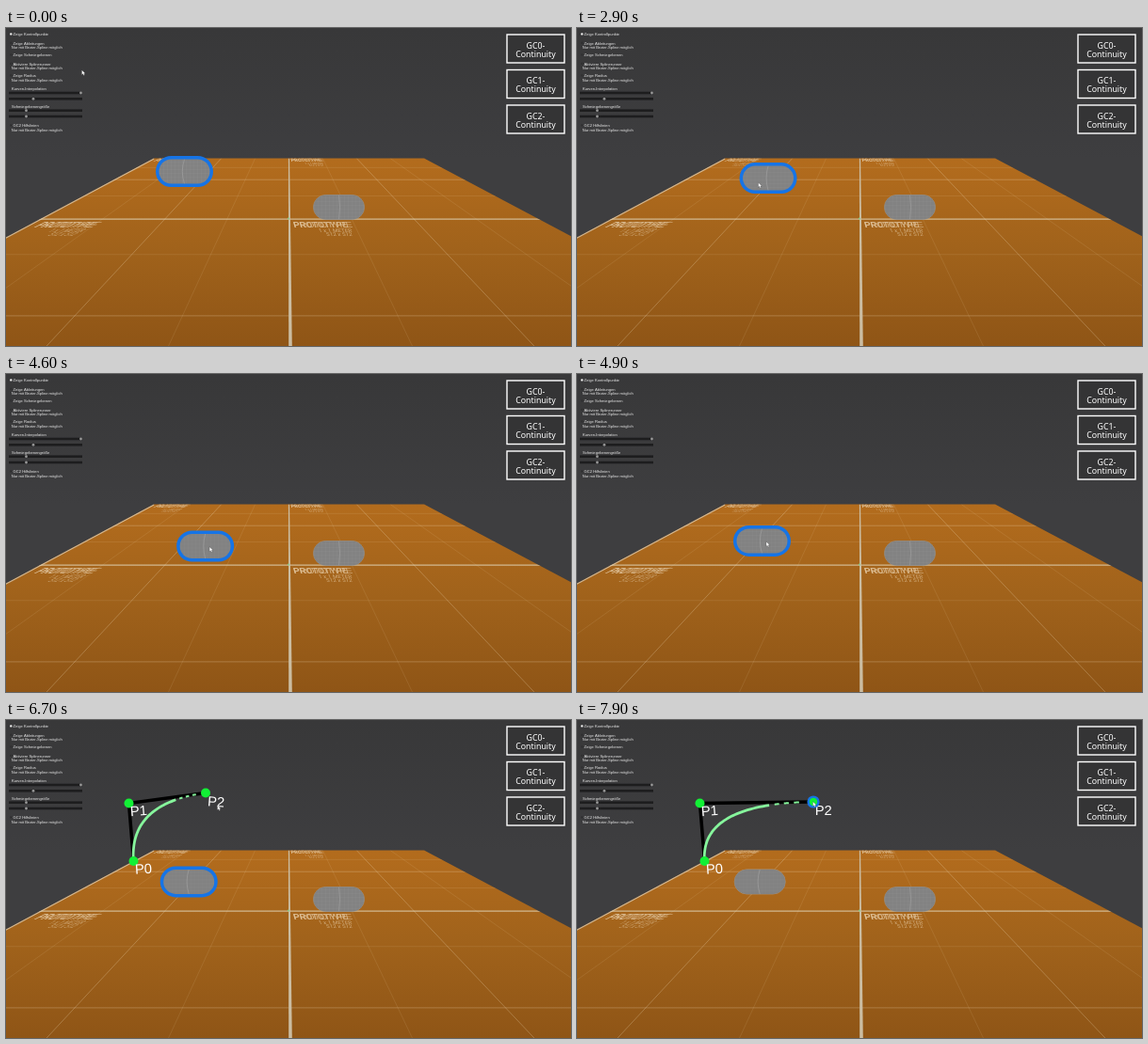
Recreate the animation shown at these times as an HTML page with a canvas. Size 600 by 338 pixels, loop 8 s.

```html
<!DOCTYPE html>
<html lang="de">
<head>
<meta charset="utf-8">
<style>
html, body { margin: 0; width: 600px; height: 338px; overflow: hidden; background: #3a3a3b; }
canvas { display: block; }
</style>
</head>
<body>
<canvas id="stage" width="600" height="338"></canvas>
<script>
const c = document.getElementById('stage').getContext('2d');
const LOOP = 8000, BLUE = '#1674e6', GREEN = '#12f035', MINT = '#86f59c';
const SANS = '"Liberation Sans", Arial, sans-serif';
const ROBOTO = 'Roboto, sans-serif', NOTO = '"Noto Sans", sans-serif';

const P0 = [135.5, 150], P1 = [130.5, 88.5], P2 = [212, 77.5], P2_END = [251, 87];
const shown = { p0: 5400, p1: 5800, p2: 6300, pick: 7350 };
const drag = { start: 2500, circle: 3500, back: 4600, end: 5050 };

function ease(t, from, to) {
  const u = Math.min(1, Math.max(0, (t - from) / (to - from)));
  return u * u * (3 - 2 * u);
}
const mix = (a, b, u) => a.map((v, i) => v + (b[i] - v) * u);

// Dragged onto a circle, led round it, then partly back
function capsulePos(t) {
  const { start, circle, back, end } = drag;
  const turn = 285 * ease(t, circle, back) - 95 * ease(t, back, end);
  const a = turn * Math.PI / 180;
  const onCircle = [208 + 14 * Math.cos(a), 169.5 - 14 * Math.sin(a)];
  return mix([189.5, 152.5], onCircle, ease(t, start, circle - 100));
}

const endPos = t => mix(P2, P2_END, ease(t, 7450, 7850));

function grip(t) {
  const [x, y] = capsulePos(t);
  const u = ease(t, drag.circle, drag.back);
  return [x - 10 + 15 * u, y + 5 - 4 * u];
}

function cursorPos(t) {
  const visits = [
    [1200, 1600, [228, 110]], [2200, 2450, grip(t)], [5150, 5350, P0], [5500, 5700, P1],
    [5900, 6150, P2], [6400, 6650, [225, 91]], [7200, 7350, endPos(t)]
  ];
  return visits.reduce((pos, [from, to, goal]) => mix(pos, goal, ease(t, from, to)), [81, 45]);
}

function path(points, color, width) {
  c.beginPath();
  points.forEach(p => c.lineTo(...p));
  c.strokeStyle = color;
  c.lineWidth = width;
  c.stroke();
}

function fillShape(points, color) {
  c.beginPath();
  points.forEach(p => c.lineTo(...p));
  c.closePath();
  c.fillStyle = color;
  c.fill();
}

function dot(x, y, r, color) {
  c.beginPath();
  c.arc(x, y, r, 0, 7);
  c.fillStyle = color;
  c.fill();
}

function text(s, x, y, size, family, color = '#fff', align = 'left') {
  c.font = `${size}px ${family}`;
  c.textAlign = align;
  c.fillStyle = color;
  c.fillText(s, x, y);
}

function gradient(from, to, ...colors) {
  const g = c.createLinearGradient(0, from, 0, to);
  colors.forEach((color, i) => g.addColorStop(i / (colors.length - 1), color));
  return g;
}

// Floor perspective: u runs -1..1 across, v counts tiles beyond the front label line
const MID = 300.5, HORIZON = 62, BOTTOM = 338;
const floorY = v => HORIZON + 1 / (.00709 + .00598 * v);
const floorX = (u, y) => MID + u * (y - HORIZON) * 1.876 + Math.max(0, y - 138) * .0075;
const FAR = floorY(1);
const rail = u => [[floorX(u, FAR), FAR], [floorX(u, BOTTOM), BOTTOM]];

function floorLabel(x, y, scale) {
  c.save();
  c.transform(scale, 0, scale * (x + 30 * scale - MID) / (y - HORIZON), scale * .82, x, y);
  const color = 'rgba(228,202,165,.72)';
  text('PROTOTYPE', 0, 0, 10.2, 'bold ' + ROBOTO, color);
  c.font = `bold 10.2px ${ROBOTO}`;
  c.fillText('PROTOTYPE', 0, 0);
  text('1 x 1 METER', 25, 6.3, 6.3, ROBOTO, color);
  text('512 x 512', 32, 11, 6.3, ROBOTO, color);
  c.restore();
}

function floor() {
  c.save();
  fillShape([...rail(-1), ...rail(1).reverse()], gradient(FAR, BOTTOM, '#b36c1d', '#a0621b', '#8f5516'));
  c.clip();
  for (let q = -3; q < 4; q++) {
    const alpha = q % 2 ? .12 : .3;
    const color = `rgba(240,222,190,${alpha})`;
    const y = floorY(q / 4);
    if (q) path(rail(q / 4), color, .9);
    if (q && q > -3) path([[0, y], [600, y]], color, .9);
  }
  path([[0, 203.2], [600, 203.2]], 'rgba(225,212,185,.75)', 1.2);
  path(rail(-1), 'rgba(225,212,190,.75)', 2.2);
  fillShape([[299.9, FAR], [301.1, FAR], [303.8, BOTTOM], [300.2, BOTTOM]], '#cbbda2');
  c.restore();
  [306, 29].forEach(x => floorLabel(x, 211.8, 1));
  [303, 156].forEach(x => floorLabel(x, 142, .55));
  dot(300, 202.5, .9, '#7fd08a');
}

function panel() {
  const small = (s, x, y) => text(s, x, y, 4.1, SANS, '#eee');
  const toggle = (label, y, on, hinted) => {
    dot(5.3, y - 1.6, 1.2, on ? '#eee' : '#303031');
    small(label, 7.6, y);
    if (hinted) small('Nur mit Bezier-Spline möglich', 5.8, y + 4.5);
  };
  const sliders = (label, y, ...handles) => {
    small(label, 6, y);
    handles.forEach((x, i) => {
      const sy = y + 3 + i * 6.3;
      c.fillStyle = '#1d1d1e';
      c.fillRect(3, sy - 1.3, 78, 2.6);
      dot(x, sy, 1.4, '#999');
    });
  };
  toggle('Zeige Kontrollpunkte', 8, true);
  toggle('Zeige Ableitungen', 17.5, false, true);
  toggle('Zeige Schmiegebenen', 30);
  toggle('Aktiviere Splinerunner', 39.5, false, true);
  toggle('Zeige Radius', 52, false, true);
  sliders('Kurven-Interpolation', 66, 79.5, 29);
  sliders('Schmiegebenengröße', 84.7, 21.5, 21.5);
  toggle('GC2 Hilfslinien', 105, false, true);
}

function buttons() {
  for (let i = 0; i < 3; i++) {
    const y = 7 + i * 37.5;
    c.fillStyle = '#343435';
    c.fillRect(532, y, 61, 30);
    c.strokeStyle = '#fff';
    c.lineWidth = 1.4;
    c.strokeRect(532, y, 61, 30);
    text(`GC${i}-`, 562.5, y + 14.8, 8.8, NOTO, '#fff', 'center');
    text('Continuity', 562.5, y + 23.6, 8.8, NOTO, '#fff', 'center');
  }
}

function capsule([x, y], selected) {
  c.save();
  c.translate(x, y);
  c.beginPath();
  c.roundRect(-27, -13, 54, 26, 13);
  c.strokeStyle = selected ? BLUE : '#a0a0a0';
  c.lineWidth = selected ? 7 : .7;
  c.stroke();
  c.fillStyle = '#828282';
  c.fill();
  c.clip();
  for (let d = -26; d < 27; d += 4) {
    path([[d, -13], [d, 13]], 'rgba(255,255,255,.05)', .6);
    path([[-27, d], [27, d]], 'rgba(255,255,255,.05)', .6);
  }
  c.beginPath();
  c.moveTo(0, -13);
  c.quadraticCurveTo((x - MID) / 25, 0, 0, 13);
  c.strokeStyle = '#9c9c9c';
  c.lineWidth = .8;
  c.stroke();
  c.restore();
}

function bezier(end, from, to) {
  return Array.from({ length: 41 }, (_, i) => {
    const s = from + (to - from) * i / 40;
    return mix(mix(P0, P1, s), mix(P1, end, s), s);
  });
}

function point([x, y], label, tilt) {
  dot(x, y, 5, GREEN);
  c.save();
  c.translate(x + 1.7, y + 13.8);
  c.rotate(tilt);
  text(label, 0, 0, 14.8, SANS);
  c.restore();
}

function spline(t) {
  const end = endPos(t);
  if (t >= shown.p2) {
    path([P0, P1, end], '#000', 3.5);
    path(bezier(end, 0, .78), MINT, 2.8);
    for (let s = .81; s < .95; s += .05) path(bezier(end, s, s + .025), MINT, 2);
  }
  if (t >= shown.p0) point(P0, 'P0', -.06);
  if (t >= shown.p1) point(P1, 'P1', -.08);
  if (t >= shown.p2) point(end, 'P2', .08 * (1 - ease(t, 7450, 7850)));
  if (t >= shown.pick) {
    c.beginPath();
    c.arc(...end, 5.4, 0, 7);
    c.strokeStyle = BLUE;
    c.lineWidth = 2.4;
    c.stroke();
  }
}

function cursor([x, y]) {
  c.save();
  c.translate(x - .5, y - .3);
  fillShape([[0, 0], [0, 5], [1.2, 4], [2.1, 5.9], [3, 5.4], [2.2, 3.7], [3.7, 3.6]], '#fff');
  c.strokeStyle = 'rgba(30,30,30,.6)';
  c.lineWidth = .4;
  c.stroke();
  c.restore();
}

function draw() {
  // The view updates ten times a second
  const t = Math.floor(performance.now() % LOOP / 100) * 100;
  c.fillStyle = gradient(0, 140, '#383839', '#3e3e40');
  c.fillRect(0, 0, 600, BOTTOM);
  floor();
  panel();
  buttons();
  capsule([353.5, 190.5], false);
  capsule(capsulePos(t), t < shown.pick);
  spline(t);
  cursor(cursorPos(t));
  requestAnimationFrame(draw);
}
draw();
</script>
</body>
</html>
```
